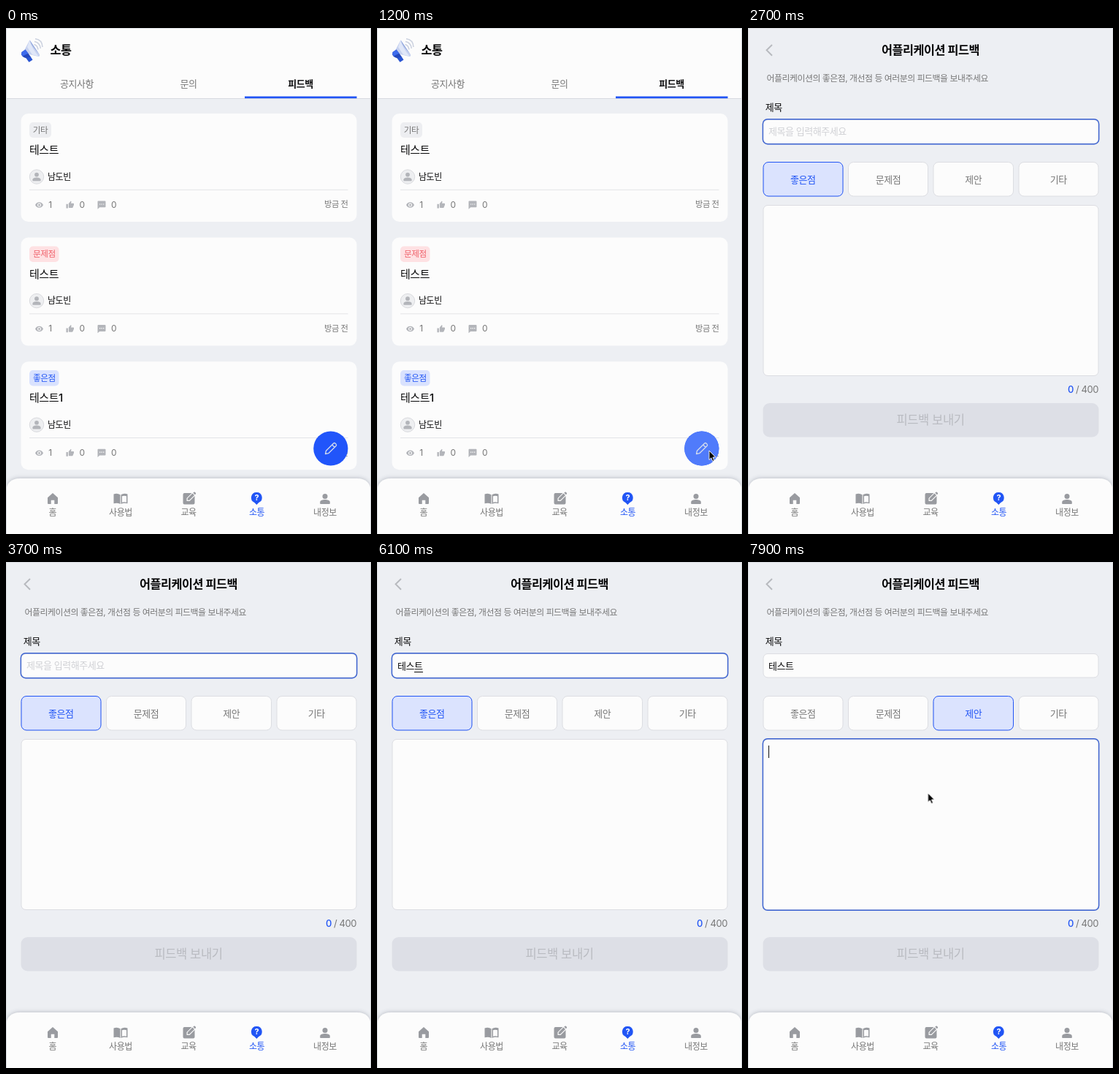
An HTML page for the animation above (8 s loop, 500 by 692 pixels).

```html
<!DOCTYPE html>
<html lang="ko">
<head>
<meta charset="utf-8">
<title>피드백</title>
<style>
  html, body { margin: 0; width: 100%; height: 100%; overflow: hidden; background: #edeff3; }
  body { position: relative; font: 13px Inter, "Noto Sans CJK KR", "Noto Sans CJK", sans-serif; letter-spacing: -.035em; }
  svg { position: absolute; left: 0; top: 0; display: block; }
  text { fill: #777; }
  .mid { text-anchor: middle; }
  .end { text-anchor: end; }
  .ink { fill: #0c0c0d; font-weight: 500; }
  .head { fill: #060607; font-weight: 700; font-size: 16.3px; }
  .t15 { font-size: 15px; }
  .t12 { font-size: 12px; }
  .t11 { font-size: 11.6px; }
  .blue { fill: #2155f5; font-weight: 500; }
  .panel { fill: #fcfcfc; }
  .box { fill: #fcfcfc; stroke: #dcdde2; }
  .picked { fill: #dbe3fe; stroke: #2155f5; }
  .focus { fill: none; stroke: #3c63d2; stroke-width: 1.4; }
  .icon { fill: #999ba0; }
  .small { fill: #b3b5ba; }

  .anim, .anim::before { animation: 8s step-end infinite; }
  .list { animation-name: list; }
  .form { animation-name: form; }
  .hover { animation-name: hover; }
  .hint { animation-name: hint; }
  .title-focus { animation-name: title-focus; }
  .good { animation-name: good; }
  .idea { animation-name: idea; }
  .note { animation-name: note; }
  @keyframes list { 0% { opacity: 1 } 19.4%, 100% { opacity: 0 } }
  @keyframes form { 0% { opacity: 0 } 19.4%, 100% { opacity: 1 } }
  @keyframes hover { 0% { opacity: 0 } 13.1%, 100% { opacity: 1 } }
  @keyframes hint { 0% { opacity: 1 } 56.25%, 100% { opacity: 0 } }
  @keyframes title-focus { 0% { opacity: 0 } 27.5% { opacity: 1 } 91.8%, 100% { opacity: 0 } }
  @keyframes good { 0% { opacity: 1 } 91.8%, 100% { opacity: 0 } }
  @keyframes idea { 0% { opacity: 0 } 91.8%, 100% { opacity: 1 } }
  @keyframes note { 0% { opacity: 0 } 98.1%, 100% { opacity: 1 } }

  /* Syllables compose one letter at a time; the open syllable is underlined. */
  .typed { position: absolute; left: 28px; top: 132px; height: 20px; line-height: 20px; display: flex; color: #0c0c0d; }
  .done::before { content: ""; animation-name: done; }
  .open::before { content: ""; animation-name: open; border-bottom: 1px solid #0c0c0d; }
  @keyframes done {
    0% { content: "" } 61.25% { content: "테" } 66.9% { content: "테스" } 91.8%, 100% { content: "테스트" }
  }
  @keyframes open {
    0% { content: ""; border-color: transparent }
    56.25% { content: "ㅌ"; border-color: #0c0c0d }
    58.1% { content: "테"; border-color: #0c0c0d }
    60% { content: "텟"; border-color: #0c0c0d }
    61.25% { content: "스"; border-color: #0c0c0d }
    65% { content: "슽"; border-color: #0c0c0d }
    66.9% { content: "트"; border-color: #0c0c0d }
    91.8%, 100% { content: ""; border-color: transparent }
  }
  .caret { width: 1px; height: 17px; margin-top: 2px; background: #111; animation-name: caret; }
  @keyframes caret {
    0%, 33.75%, 46.25%, 73.1%, 85.6%, 100% { opacity: 0 }
    27.5%, 40%, 52.5%, 79.4% { opacity: 1 }
  }

  .cursor { animation: move 8s linear infinite, seen 8s step-end infinite; }
  @keyframes move {
    0%, 9% { transform: translate(497px, 540px) }
    13%, 18.75% { transform: translate(455px, 578px) }
    20% { transform: translate(430px, 520px) }
    23.75% { transform: translate(245px, 165.5px) }
    26%, 30% { transform: translate(240px, 143px) }
    30.1%, 92% { transform: translate(296px, 203px) }
    97%, 100% { transform: translate(246.5px, 316px) }
  }
  @keyframes seen { 0% { opacity: 0 } 10% { opacity: 1 } 30% { opacity: 0 } 88.5%, 100% { opacity: 1 } }
</style>
</head>
<body>
<svg width="500" height="692" viewBox="0 0 500 692">
  <defs>
    <filter id="lift" x="-10%" y="-30%" width="120%" height="160%">
      <feDropShadow dx="0" dy="-1" stdDeviation="2.5" flood-color="#555b70" flood-opacity=".3"/>
    </filter>
    <g id="person">
      <circle cy="-3.6" r="3.5"/>
      <path d="M-6.8 6.2V4.6C-6.8 2-3 1.1 0 1.1S6.8 2 6.8 4.6V6.2Q6.8 7 6 7H-6Q-6.8 7-6.8 6.2z"/>
    </g>
    <g id="card">
      <rect class="panel" x="20.5" y="117" width="460" height="148" rx="10"/>
      <circle cx="42" cy="203.5" r="9.7" fill="#eeeff1" stroke="#d9dade"/>
      <use href="#person" class="small" transform="translate(42 203.5) scale(.82)"/>
      <text class="ink t12" x="57" y="207.8">남도빈</text>
      <path d="M32 221.3H468.500" stroke="#e3e4e7"/>
      <path class="small" fill-rule="evenodd" transform="translate(39.500 236) scale(.5)" d="M12 4.500C7 4.500 2.700 7.600 1 12c1.700 4.400 6 7.500 11 7.500s9.300-3.100 11-7.500C21.300 7.600 17 4.500 12 4.500zM12 17a5 5 0 1 1 0-10 5 5 0 0 1 0 10zM12 9a3 3 0 1 0 0 6 3 3 0 0 0 0-6z"/>
      <path class="small" transform="translate(82 236) scale(.48)" d="M1 22h5V10H1zM23 10c0-1.100-.9-2-2-2h-6.300l1-4.900-1.500-2.100L8.500 7.600Q8 8.200 8 9v10a2 2 0 0 0 2 2h8q1.300 0 1.800-1.200L22.800 12.700z"/>
      <path class="small" d="M126.500 236.500h9q1 0 1 1v6.800q0 1-1 1h-7.300l-2.700 2.400v-10.200q0-1 1-1z"/>
      <path d="M128 241h1.300m1.200 0h1.300m1.200 0h1.300" stroke="#fff" stroke-width="1.200"/>
      <g class="t12">
        <text x="58.300" y="245.700">1</text>
        <text x="100.500" y="245.700">0</text>
        <text x="144" y="245.700">0</text>
      </g>
      <text class="end" font-size="11.300" x="468.500" y="245.400">방금 전</text>
    </g>
  </defs>

  <rect width="500" height="692" fill="#edeff3"/>

  <g class="anim list">
    <rect class="panel" width="500" height="96"/>
    <path d="M0 96.500H500" stroke="#d8dae0"/>
    <g>
      <path d="M32.500 16.500L46 36.500Q46.800 39 44.200 39L29.500 35.500 25.500 29.500z" fill="#c6d1ef"/>
      <path d="M32.500 16.500L46 36.500Q44 34 39 28T32.500 16.500z" fill="#8fa5dc"/>
      <path d="M32.300 17Q35 27 44.500 38.500L36 36.500 29 26z" fill="#e0e7f8"/>
      <path d="M26.500 29.500L34 39.500 28.500 41.500Q23 40.500 21 36.500L21.500 33z" fill="#2448bd"/>
      <path d="M26.500 29.500L21.500 33Q20.500 35.500 22.500 38.500L30.500 34.800z" fill="#3d6bec"/>
      <path d="M27.500 41.200L33.500 39 36.500 43.600 31.500 46.700z" fill="#2854d2"/>
      <path d="M38.500 22.500Q43 23.500 44 29.500M39 18.500Q46.500 20 47.300 28M40 14.800Q49.500 16 50 26" fill="none" stroke="#cbd1df" stroke-width="1.600"/>
    </g>
    <text class="head" x="60.500" y="35.700">소통</text>
    <g class="mid">
      <text x="97" y="81">공지사항</text>
      <text x="250" y="81">문의</text>
      <text class="ink" style="font-weight:700" x="403.500" y="81">피드백</text>
    </g>
    <rect x="327" y="93.500" width="153.500" height="2.700" fill="#2155f5"/>

    <use href="#card"/>
    <rect x="32" y="129" width="30" height="21" rx="5" fill="#edeef1"/>
    <text class="t11 mid" x="47" y="143.500">기타</text>
    <text class="ink t15" x="32" y="172">테스트</text>

    <use href="#card" y="169.600"/>
    <rect x="32" y="298.500" width="40.500" height="21.500" rx="5" fill="#fee1e3"/>
    <text class="t11 mid" x="52.300" y="313.200" style="fill:#f0616b">문제점</text>
    <text class="ink t15" x="32" y="341.600">테스트</text>

    <use href="#card" y="339.200"/>
    <rect x="32" y="468" width="40.500" height="21.500" rx="5" fill="#d9e2fe"/>
    <text class="t11 mid blue" x="52.300" y="482.700">좋은점</text>
    <text class="ink t15" x="32" y="511.200">테스트1</text>

    <circle cx="444.800" cy="575" r="23.600" fill="#2155fa"/>
    <circle class="anim hover" cx="444.800" cy="575" r="23.600" fill="#507bfb"/>
    <path d="M437.500 582.500l.9-4.200 10.300-10.300q1.300-1 2.500.2l.9.9q1.100 1.200 0 2.400l-10.400 10.200zM446.700 570l3.500 3.500" fill="none" stroke="#d3dbed" stroke-width="1.300" stroke-linejoin="round"/>
  </g>

  <g class="anim form">
    <rect width="500" height="692" fill="#edeff3"/>
    <path d="M33 23L25.500 30.300 33 37.700" fill="none" stroke="#b7b9be" stroke-width="1.900"/>
    <text class="head mid" x="250" y="35.700">어플리케이션 피드백</text>
    <text font-size="11.900" x="25.500" y="73">어플리케이션의 좋은점, 개선점 등 여러분의 피드백을 보내주세요</text>
    <text class="ink" x="23.700" y="112.500">제목</text>

    <rect class="box" x="21" y="125.500" width="459" height="32.500" rx="6"/>
    <rect class="anim focus title-focus" x="20.300" y="124.700" width="460.400" height="34" rx="6.500"/>
    <text class="anim hint" x="28" y="146.300" style="fill:#d0d1d5">제목을 입력해주세요</text>

    <g class="box">
      <rect x="21" y="183.500" width="109" height="46.500" rx="7"/>
      <rect x="137.500" y="183.500" width="109" height="46.500" rx="7"/>
      <rect x="254" y="183.500" width="109.500" height="46.500" rx="7"/>
      <rect x="371" y="183.500" width="109" height="46.500" rx="7"/>
    </g>
    <g class="mid">
      <text x="75.300" y="211.500">좋은점</text>
      <text x="192" y="211.500">문제점</text>
      <text x="308.700" y="211.500">제안</text>
      <text x="425.300" y="211.500">기타</text>
      <g class="anim good">
        <rect class="picked" x="21" y="183.500" width="109" height="46.500" rx="7"/>
        <text class="blue" x="75.300" y="211.500">좋은점</text>
      </g>
      <g class="anim idea">
        <rect class="picked" x="254" y="183.500" width="109.500" height="46.500" rx="7"/>
        <text class="blue" x="308.700" y="211.500">제안</text>
      </g>
    </g>

    <rect class="box" x="21" y="242.500" width="459" height="233" rx="6"/>
    <g class="anim note">
      <rect class="focus" x="20.300" y="241.700" width="460.400" height="234.600" rx="6.500"/>
      <path d="M28.500 251V268" stroke="#111"/>
    </g>
    <text class="end" x="480" y="499"><tspan class="blue">0</tspan> / 400</text>
    <rect x="20.500" y="513" width="460" height="46.500" rx="9" fill="#dddfe6"/>
    <text class="mid" font-size="16.600" x="250" y="541.500" style="fill:#b9bbc1">피드백 보내기</text>
  </g>

  <g>
    <path class="panel" filter="url(#lift)" d="M0 700V636Q0 616 20 616H480Q500 616 500 636V700z"/>
    <path class="icon" d="M57 642.300L64 636l7 6.300V650q0 1-1 1h-3.700v-5.300h-4.600V651H58q-1 0-1-1z"/>
    <g class="icon">
      <path d="M147.500 637.500q5-2 9 .8V651q-4-2.200-9-.7z"/>
      <path d="M166.500 637.500q-5-2-9 .8V651q4-2.200 9-.7z"/>
      <path d="M159 640.200q3-.9 6 0v8.500q-3-.8-6 0z" fill="#fcfcfc"/>
    </g>
    <path class="icon" d="M244.500 636h10l-7 7v4h4l7-7v9.500q0 2-2 2h-12q-2 0-2-2v-11.500q0-2 2-2z"/>
    <path class="icon" d="M248.700 645.800v-2.500l6.800-6.800 2.500 2.500-6.800 6.800zM256.300 635.700l1-1q.8-.6 1.600.1l.9.9q.7.800.1 1.600l-1 1z"/>
    <path d="M343.300 635a7.300 7.300 0 0 1 3 14l-3 3-3-3a7.300 7.300 0 0 1 3-14z" fill="#2155f5"/>
    <text class="mid" x="343.300" y="646.300" style="fill:#fff;font-size:11px;font-weight:700">?</text>
    <use href="#person" class="icon" transform="translate(437 644)"/>
    <g class="mid t12">
      <text x="63.700" y="666.800">홈</text>
      <text x="157" y="666.800">사용법</text>
      <text x="250" y="666.800">교육</text>
      <text class="blue" x="343.500" y="666.800">소통</text>
      <text x="437" y="666.800">내정보</text>
    </g>
  </g>
  <path d="M.5 692V.5H499.500V692" fill="none" stroke="#dcdee3"/>
</svg>

<div class="typed">
  <span class="anim done"></span><span class="anim open"></span><i class="anim caret"></i>
</div>

<svg width="500" height="692" viewBox="0 0 500 692">
  <path class="cursor" d="M0 0V12.500L2.800 9.900 4.800 14.500 7 13.500 5 9H8.800z" fill="#050505" stroke="#fff" stroke-width=".9"/>
</svg>
</body>
</html>
```
